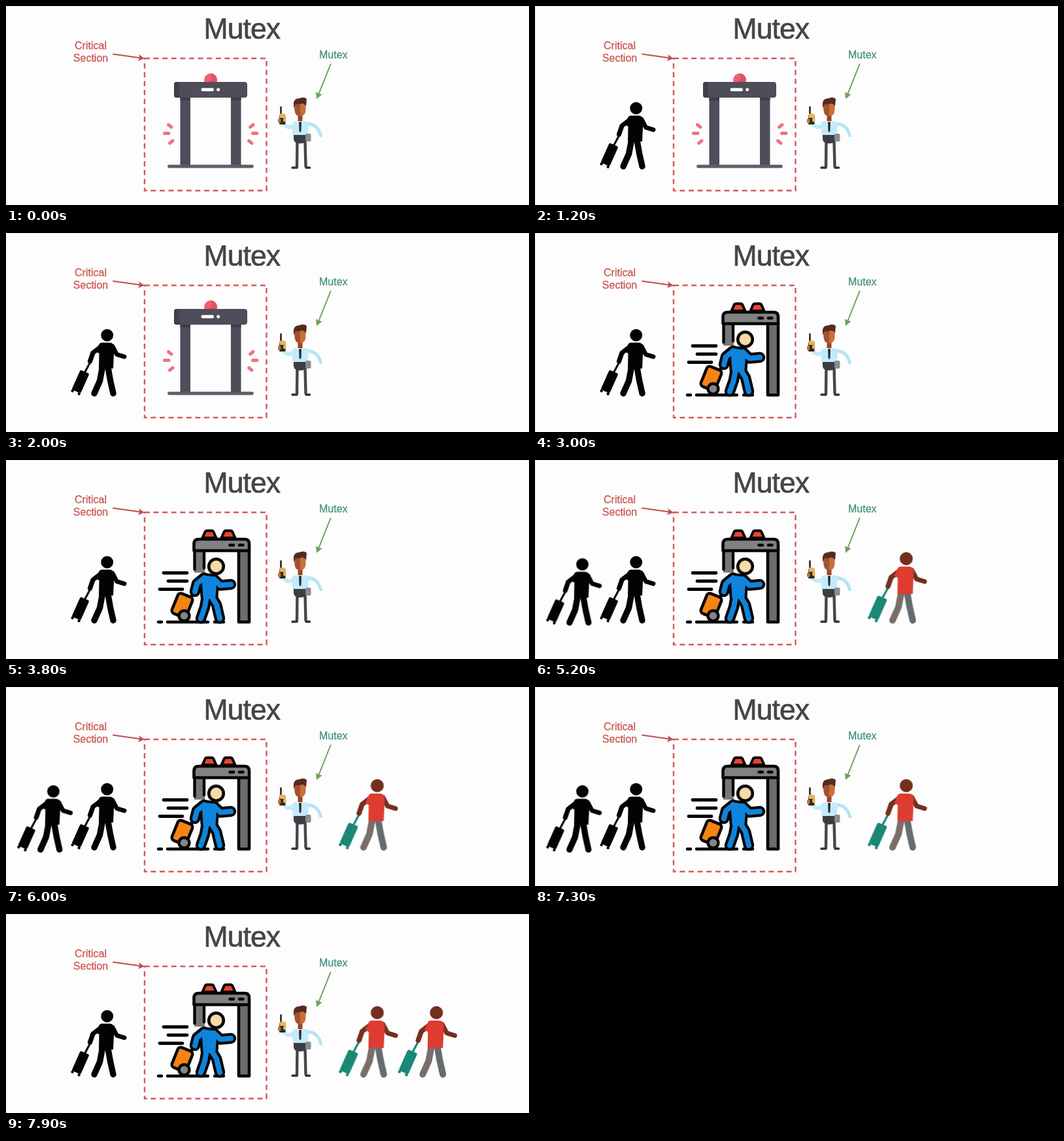
Animation of 800x304 px, one loop 8 s. Source, as an HTML page:

```html
<!DOCTYPE html>
<html lang="en">
<head>
<meta charset="utf-8">
<title>Mutex</title>
<style>
  html, body { margin: 0; width: 100%; height: 100%; overflow: hidden; background: #fdfdfd; }
  svg { display: block; width: 800px; height: 304px; }
  text {
    font-family: "Liberation Sans", Arial, sans-serif; font-size: 16px;
    stroke: currentColor; fill: currentColor; stroke-width: .3px;
  }
  .title { font-size: 44.5px; letter-spacing: -.9px; stroke-width: .7px; }
  .line { fill: none; stroke-linecap: round; stroke-linejoin: round; }
</style>
</head>
<body>
<svg id="stage" viewBox="0 0 800 304"></svg>
<script>
const LOOP = 8000;

const line = (d, color, width) =>
  `<path class="line" d="${d}" stroke="${color}" stroke-width="${width}"/>`;
const shape = (d, fill, extra = '') => `<path d="${d}" fill="${fill}" ${extra}/>`;
const rect = (x, y, w, h, fill, r = 0, extra = '') =>
  `<rect x="${x}" y="${y}" width="${w}" height="${h}" rx="${r}" fill="${fill}" ${extra}/>`;
const dot = (x, y, r, fill, extra = '') =>
  `<circle cx="${x}" cy="${y}" r="${r}" fill="${fill}" ${extra}/>`;
const group = (body, attrs = '') => `<g ${attrs}>${body}</g>`;
const outline = (width, color = '#050505') =>
  `stroke="${color}" stroke-width="${width}" stroke-linejoin="round"`;

const labels = () => `
  <text class="title" x="302.500" y="50" color="#454545">Mutex</text>
  <text x="129.5" y="66" color="#cb5753" text-anchor="middle">Critical</text>
  <text x="129.5" y="85" color="#cb5753" text-anchor="middle">Section</text>
  <text x="479" y="80" color="#439180">Mutex</text>`
  + line('M164 73.6L205 79.2', '#b85450', 2)
  + shape('M212 80.3L202 84L204.4 79.1L203.2 74Z', '#b85450')
  + line('M496.5 89L478.5 134', '#6ca35a', 2)
  + shape('M475 142L474 131.2L478.5 133.8L483.6 135Z', '#6ca35a')
  + rect(212, 80, 186.5, 202, 'none', 0,
      'stroke="#d5585a" stroke-width="2.4" stroke-dasharray="8 5.6"');

const idleGate = () =>
  dot(313, 113, 10, '#f1606e')
  + shape('M313 103A10 10 0 0 1 322 117H308Q318 113 313 103Z', '#dc5263')
  + rect(266.5, 136, 15.5, 108, '#4e4d5a')
  + rect(344, 136, 15.5, 108, '#4e4d5a')
  + rect(266.5, 139, 15.5, 5, '#3d3c48')
  + rect(344, 139, 15.5, 5, '#3d3c48')
  + rect(257, 116, 112, 24, '#4e4d5a', 4)
  + shape('M261 116H266Q262 127 267 140H261Q257 140 257 136V120Q257 116 261 116Z', '#403f4b')
  + rect(298.5, 125.3, 19.5, 5, '#fdfdfd', 2.5)
  + dot(324.7, 127.8, 2.5, '#fdfdfd')
  + line('M249.5 245H376.5', '#5d5c68', 4.8)
  + line('M248.5 181.5L253 185M242.5 194.5H249M255 206L250.5 209.5'
      + 'M378 181.5L373.5 185M384 194.5H377.5M371.5 206L376 209.5', '#f0727f', 5);

const lamp = x =>
  shape(`M${x} 119L${x + 4} 110Q${x + 5} 108 ${x + 7} 108H${x + 14}Q${x + 16} 108 ${x + 17} 110L${x + 21} 119Z`,
    '#e8452f', outline(4));

const suit = '#0f84dc';
const torso = 'M303 180L319 182L317 209L305 209Z';
const limbs = 'M318 182L328 191.500L344 190M303 180L292 189L289 201'
  + 'M314 208L322 221L327 242M307 208L304 225L298 242';

const busyGate = () =>
  lamp(300.5) + lamp(329.5)
  + rect(288, 139, 16, 33, '#777777')
  + line('M288.5 139V167M303 139V165', '#050505', 4.4)
  + rect(356, 138, 16, 109.5, '#6d6d6e', 0, outline(4.6))
  + shape('M287.500 138.500V128Q287.500 121 295 121H365Q372 121 372 128V138.500Z', '#818181', outline(4.6))
  + line('M342.5 130H348M357 130H362.5', '#050505', 4.5)
  + line('M241 172.500H277M248 185H277M235 197.500H270', '#050505', 4.8)
  + line('M233 247.5H238M247 247.5H309M319 247.5H333', '#050505', 4.5)
  + line('M283 210L288 201', '#050505', 5)
  + group(rect(-12, -16.5, 24, 33, '#f58413', 5, outline(4.5)), 'transform="translate(269.500 222) rotate(22)"')
  + dot(272.5, 238, 8, '#858585', outline(4.4))
  + line(limbs, '#050505', 16.5)
  + shape(torso, suit, outline(15))
  + line(limbs, suit, 8)
  + shape(torso, suit, outline(7, suit))
  + dot(321.5, 162.5, 11.3, '#f9d9a6', outline(4.6));

const guard = () =>
  line('M445.500 206L445 245M457.5 206L458.500 245', '#46464c', 4.4)
  + line('M438 247H445M459 247H464.500', '#303036', 3.4)
  + line('M441 181Q434 189 425 181', '#c4ecf9', 6)
  + line('M460 180Q477 180 481.5 198', '#b5e4f6', 4.8)
  + shape('M442 176H459Q464 177 463 184L461 199H439L437 184Q437 177 442 176Z', '#c4ebf9')
  + rect(446.500, 166, 7, 11, '#96482a')
  + shape('M445 176H455L450 182Z', '#ffffff')
  + shape('M448 177H452L451.5 191L450 193L448.5 191Z', '#25303b')
  + shape('M440 197H460V203Q460 210 450 210Q440 210 440 203Z', '#3c3c42')
  + rect(458, 195, 8.5, 12, '#8b8a90', 2)
  + shape('M441.500 149H458.500V158Q458.500 168 450 168Q441.500 168 441.500 158Z', '#c8703a')
  + shape('M441.500 149H450V168Q441.500 168 441.500 158Z', '#a2522c')
  + shape('M440 156V148Q441 141 449 141Q456 138 460 142L459 153Q457 149 452 149Q447 151 443 150Z', '#552a22')
  + line('M420.5 154.500V166', '#222222', 2.6)
  + rect(418, 166, 9.5, 15, '#2c2a27', 1.5)
  + rect(418.5, 164.5, 9, 6.5, '#eeb256', 1.5)
  + rect(416, 172, 4.5, 7, '#b9743f', 2)
  + rect(424, 171, 4.5, 6, '#eeb256', 2);

const traveller = ({ skin, shirt, back, front, bag }) =>
  line('M121 212L128.500 198', bag, 3)
  + group(rect(-7.5, -16.5, 15, 33, bag, 2.500) + dot(-5.5, 18, 2.2, bag) + dot(5.5, 18, 2.2, bag),
      'transform="translate(114 227) rotate(24)"')
  + line('M146 173L133 183L128.500 196', skin, 7.2)
  + line('M163 173L169.500 185.500L181 189', skin, 6.8)
  + line('M147.500 205L143.500 226L135 245', back, 9.4)
  + line('M156 205L159.500 225L164 245', front, 9.4)
  + shape('M147 167.500H159Q164 167.500 165.500 174L164 207H142L142.500 184L137.500 181L142 171Q143 167.500 147 167.500Z', shirt)
  + dot(154.7, 156.2, 9.4, skin);

const black = '#030303';
const shadow = { skin: black, shirt: black, back: black, front: black, bag: black };
const tourist = { skin: '#74301f', shirt: '#de3c31', back: '#7b6d6a', front: '#656c70', bag: '#1b8775' };
const touristAt = x => `transform="translate(${x} 141) scale(1.065 1.06) translate(-98 -147)"`;

// Markup, time shown, time hidden, attributes
const parts = [
  [idleGate(), 0, 2800],
  [busyGate(), 2800, LOOP],
  [traveller(shadow), 1200, LOOP],
  [traveller(shadow), 4900, 7400, 'transform="translate(-82.300 3.300)"'],
  [traveller(tourist), 4900, LOOP, touristAt(507.5)],
  [traveller(tourist), 7400, LOOP, touristAt(598)],
];

const stage = document.getElementById('stage');
stage.innerHTML = rect(0, 0, 800, 304, '#fdfdfd')
  + shape('M0 0H800V1H1V304H0Z', '#eeeeee')
  + labels() + guard()
  + parts.map(([body, , , attrs]) => group(body, `class="part" ${attrs || ''}`)).join('');

stage.querySelectorAll('.part').forEach((el, i) => {
  const [, from, to] = parts[i];
  const steps = [[0, from ? 0 : 1]];
  if (from) steps.push([from, 1]);
  if (to < LOOP) steps.push([to, 0]);
  steps.push([LOOP, to < LOOP ? 0 : 1]);
  el.animate(
    steps.map(([at, opacity]) => ({ offset: at / LOOP, opacity, easing: 'step-end' })),
    { duration: LOOP, iterations: Infinity });
});
</script>
</body>
</html>
```
